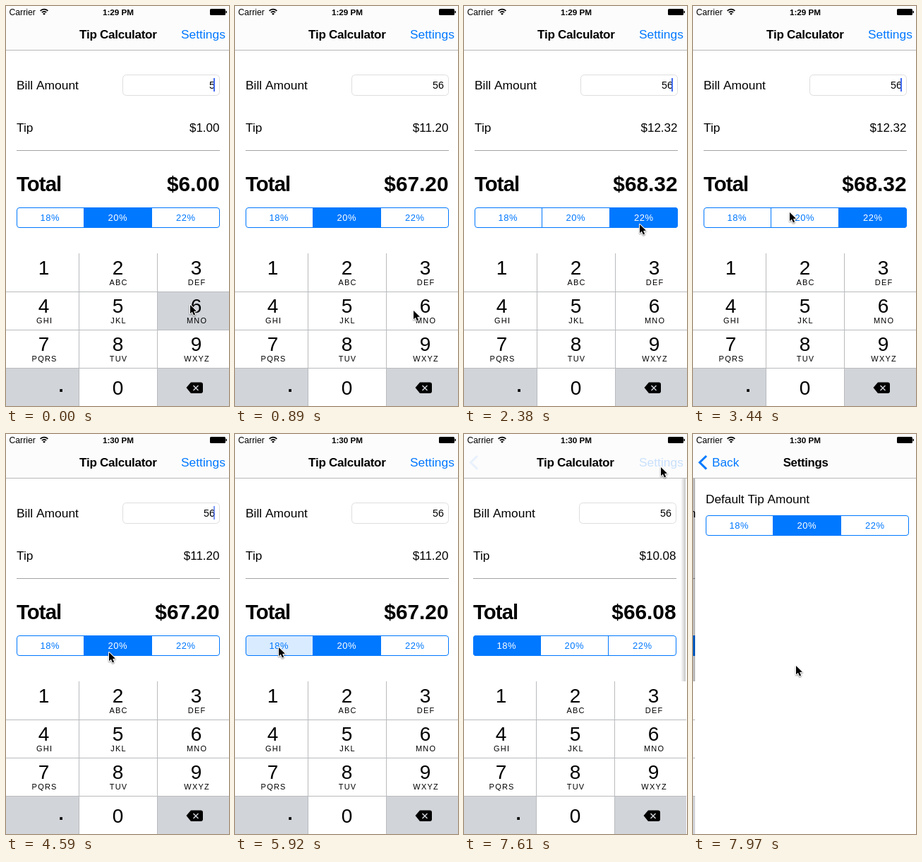
These frames come from a looping animation (316 by 566 pixels, 8000 ms). An HTML page with a canvas:

```html
<!DOCTYPE html>
<html lang="en">
<head>
<meta charset="utf-8">
<title>Tip Calculator</title>
<style>
html, body { margin: 0; width: 100%; height: 100%; overflow: hidden; background: #fff; }
canvas { display: block; width: 316px; height: 566px; }
</style>
</head>
<body>
<canvas id="stage"></canvas>
<script>
const W = 316, H = 566, LOOP = 8000, TICK = 88.5;
const BLUE = '#0078ff', KEY_GREY = '#d1d4d9';
const FONT = '"Liberation Sans", Arial, sans-serif';
const canvas = document.getElementById('stage');
const c = canvas.getContext('2d');
const dpr = window.devicePixelRatio || 1;
canvas.width = W * dpr;
canvas.height = H * dpr;

const clamp = (v) => Math.max(0, Math.min(1, v));
const mix = (a, b, u) => a + (b - a) * u;

// Pointer stops: tick, x, y
const path = [
  [0, 260, 422], [6, 260, 422], [9, 254, 428], [11, 250, 431], [12, 250, 431],
  [14, 230, 400], [16, 218, 350], [18, 236, 310], [20, 254, 299], [23, 254, 299],
  [25, 251, 317], [27, 248, 308], [34, 248, 308], [37, 180, 292], [39, 136, 291],
  [43, 145, 308], [55, 145, 308], [56, 122, 306], [57, 80, 300], [58, 60, 303],
  [62, 60, 303], [65, 61, 301], [72, 61, 301], [76, 72, 316], [77, 72, 316],
  [80, 160, 200], [83, 270, 62], [84, 278, 46], [86, 278, 46], [87, 270, 75],
  [88, 240, 155], [89, 182, 265], [90, 145, 327]
];

function pointerAt(k) {
  let i = 1;
  while (i < path.length - 1 && path[i][0] < k) i++;
  const a = path[i - 1], b = path[i];
  const u = clamp((k - a[0]) / (b[0] - a[0]));
  return [mix(a[1], b[1], u), mix(a[2], b[2], u)].map(Math.round);
}

function caretAlpha(t) {
  if (t < 635) return 1;
  if (t > 7500) return 0;
  const p = (t - 635) % 978;
  return p < 410 ? clamp(1 - p / 180) : clamp((p - 410) / 160);
}

function text(s, x, y, size, o = {}) {
  c.font = (o.bold ? 'bold ' : '') + size + 'px ' + FONT;
  c.textAlign = o.align || 'left';
  c.letterSpacing = (o.gap || 0) + 'px';
  c.fillStyle = o.color || '#000';
  c.fillText(s, o.align === 'center' ? x + (o.gap || 0) / 2 : x, y);
}

function box(x, y, w, h, color) {
  c.fillStyle = color;
  c.fillRect(x, y, w, h);
}

function poly(points, fill) {
  c.beginPath();
  points.forEach(([x, y]) => c.lineTo(x, y));
  c.closePath();
  c.fillStyle = fill;
  c.fill();
}

function fade(alpha, draw) {
  c.save();
  c.globalAlpha *= alpha;
  draw();
  c.restore();
}

function shifted(x, draw) {
  c.save();
  c.translate(x, 0);
  draw();
  c.restore();
}

function segments(y, selected, pressed) {
  const edges = [15, 110.5, 206.5, 303];
  c.save();
  c.beginPath();
  c.roundRect(15, y, 288, 29, 4);
  c.clip();
  box(15, y, 288, 29, '#fff');
  for (let i = 0; i < 3; i++) {
    const x = edges[i], w = edges[i + 1] - x;
    if (i === selected) box(x - 0.5, y, w + 1, 29, BLUE);
    else if (i === pressed) box(x, y, w, 29, '#d9ebff');
    if (i) box(x - 0.5, y, 1, 29, BLUE);
  }
  c.restore();
  c.beginPath();
  c.roundRect(15.5, y + 0.5, 287, 28, 3.5);
  c.strokeStyle = BLUE;
  c.lineWidth = 1;
  c.stroke();
  ['18%', '20%', '22%'].forEach((s, i) =>
    text(s, [62, 158, 254.5][i], y + 19, 13,
      { align: 'center', gap: 0.6, color: i === selected ? '#fff' : BLUE }));
}

function calculator(s) {
  const money = (v) => '$' + v.toFixed(2);
  const tip = s.bill * [0.18, 0.2, 0.22][s.rate];
  box(0, 63, W, H, '#fff');
  text('Bill Amount', 15, 118, 17.4);
  c.beginPath();
  c.roundRect(165.5, 97.5, 137, 29, 5);
  c.strokeStyle = '#dedede';
  c.lineWidth = 1;
  c.stroke();
  text(String(s.bill), 296, 117, 14.3, { align: 'right' });
  fade(s.caret, () => box(294, 102, 2, 19, '#426bf2'));
  text('Tip', 15, 178, 17.3);
  text(money(tip), 302.5, 178, 17, { align: 'right' });
  box(15, 204, 288, 1, '#a4a4a4');
  text('Total', 15, 262, 29.3, { bold: true, gap: -0.9 });
  text(money(s.bill + tip), 302.5, 262, 29.8, { align: 'right', bold: true });
  segments(285, s.rate, s.pressed);
}

function keypad(keyDown) {
  const cols = [53.5, 158.5, 269.5];
  const letters = ['', 'ABC', 'DEF', 'GHI', 'JKL', 'MNO', 'PQRS', 'TUV', 'WXYZ'];
  box(0, 350, W, 216, '#fff');
  box(0, 512, 103, 54, KEY_GREY);
  box(215, 512, 101, 54, KEY_GREY);
  if (keyDown) box(215, 405, 101, 53, KEY_GREY);
  [404, 458, 512].forEach((y) => box(0, y, W, 1, '#b9bbbe'));
  [103, 214].forEach((x) => box(x, 350, 1, 216, '#b9bbbe'));
  letters.forEach((s, i) => {
    const x = cols[i % 3], y = 380 + 54 * Math.floor(i / 3);
    text(String(i + 1), x, y, 28, { align: 'center' });
    text(s, x + 0.5, y + 15, 11, { align: 'center', gap: 1.2 });
  });
  text('0', cols[1], 550, 28, { align: 'center' });
  text('.', 78, 546, 26, { align: 'center', bold: true });

  // Delete key
  c.beginPath();
  c.moveTo(255.5, 540);
  c.lineTo(262, 532.5);
  c.lineTo(276, 532.5);
  c.quadraticCurveTo(279, 532.5, 279, 535.5);
  c.lineTo(279, 545);
  c.quadraticCurveTo(279, 548, 276, 548);
  c.lineTo(262, 548);
  c.closePath();
  c.fillStyle = '#000';
  c.fill();
  c.beginPath();
  c.moveTo(265.5, 537);
  c.lineTo(272.5, 544);
  c.moveTo(272.5, 537);
  c.lineTo(265.5, 544);
  c.strokeStyle = KEY_GREY;
  c.lineWidth = 1.5;
  c.stroke();
}

function settingsPage() {
  box(0, 63, W, H, '#fff');
  text('Default Tip Amount', 15, 98, 17.25);
  segments(115, 1, -1);
}

function statusBar(time) {
  text('Carrier', 4.5, 12.5, 12.2);
  text(time, 159, 12.5, 11.7, { align: 'center', bold: true });
  c.strokeStyle = '#000';
  c.lineWidth = 1.7;
  [4.2, 7.4].forEach((r) => {
    c.beginPath();
    c.arc(54, 12, r, -Math.PI * 0.76, -Math.PI * 0.24);
    c.stroke();
  });
  c.beginPath();
  c.moveTo(54, 12.8);
  c.arc(54, 12.8, 2.7, -Math.PI * 0.76, -Math.PI * 0.24);
  c.fillStyle = '#000';
  c.fill();
  c.beginPath();
  c.roundRect(289, 4, 22, 9, 1.5);
  c.fill();
  box(311.5, 7, 1.5, 3, '#000');
}

function navBar(s) {
  const p = s.push;
  const title = { align: 'center', bold: true, gap: -0.3 };
  box(0, 0, W, 62, '#fcfcfc');
  box(0, 62, W, 1, '#b8b8b8');
  statusBar(s.time);
  fade(clamp(1 - 1.3 * p), () => {
    text('Tip Calculator', 159 - Math.round(114 * Math.pow(p, 0.9)), 46, 17.1, title);
    fade(s.link, () => text('Settings', 248, 46, 17.4, { color: BLUE }));
  });
  if (!p) return;
  fade(Math.sqrt(p), () => {
    c.beginPath();
    c.moveTo(19, 31);
    c.lineTo(9.5, 40.3);
    c.lineTo(19, 49.6);
    c.strokeStyle = BLUE;
    c.lineWidth = 3;
    c.lineJoin = 'miter';
    c.stroke();
  });
  fade(p, () => {
    text('Back', 26 + 114 * (1 - p), 46, 17.3, { color: BLUE });
    text('Settings', 158.5 + 150 * (1 - p), 46, 16.8, title);
  });
}

function pointer(x, y) {
  const arrow = [[0, 0], [0, 14.5], [3.4, 11.5], [5.8, 17], [8.4, 15.8], [6, 10.6], [10.5, 10.4]];
  c.save();
  c.translate(x + 1, y + 1);
  c.scale(0.85, 0.85);
  c.shadowColor = 'rgba(0,0,0,.4)';
  c.shadowBlur = 2;
  c.shadowOffsetY = 1;
  poly(arrow, '#fff');
  c.strokeStyle = '#fff';
  c.lineWidth = 2.4;
  c.lineJoin = 'round';
  c.stroke();
  c.shadowColor = 'transparent';
  poly(arrow, '#000');
  c.restore();
}

function stateAt(k) {
  const t = k * TICK;
  const x = Math.max(0, (t - 7605) * 0.019);
  return {
    bill: k < 1 ? 5 : 56,
    keyDown: k < 2,
    rate: k < 24 ? 1 : k < 45 ? 2 : k < 68 ? 1 : 0,
    pressed: k === 23 ? 2 : k === 44 ? 1 : k === 67 ? 0 : -1,
    caret: caretAlpha(t),
    time: k < 42 ? '1:29 PM' : '1:30 PM',
    link: k < 85 ? 1 : 0.2,
    push: 1 - (1 + x) * Math.exp(-x)
  };
}

function render(k) {
  const s = stateAt(k), p = s.push, edge = Math.round(W * (1 - p));
  c.setTransform(dpr, 0, 0, dpr, 0, 0);
  box(0, 0, W, H, '#fff');
  shifted(Math.round(-95 * Math.pow(p, 0.8)), () => calculator(s));
  if (p) {
    box(0, 63, W, H, `rgba(0,0,0,${0.12 * p})`);
    const shade = c.createLinearGradient(edge - 7, 0, edge, 0);
    shade.addColorStop(0, 'rgba(0,0,0,0)');
    shade.addColorStop(1, 'rgba(0,0,0,.22)');
    box(edge - 7, 63, 7, H, shade);
    shifted(edge, settingsPage);
  }
  shifted(-Math.trunc(W * p), () => keypad(s.keyDown));
  navBar(s);
  pointer(...pointerAt(k));
}

const start = performance.now();
function loop() {
  const t = (performance.now() - start) % LOOP;
  render(Math.floor((t + 20) / TICK));
  requestAnimationFrame(loop);
}
loop();
</script>
</body>
</html>
```
